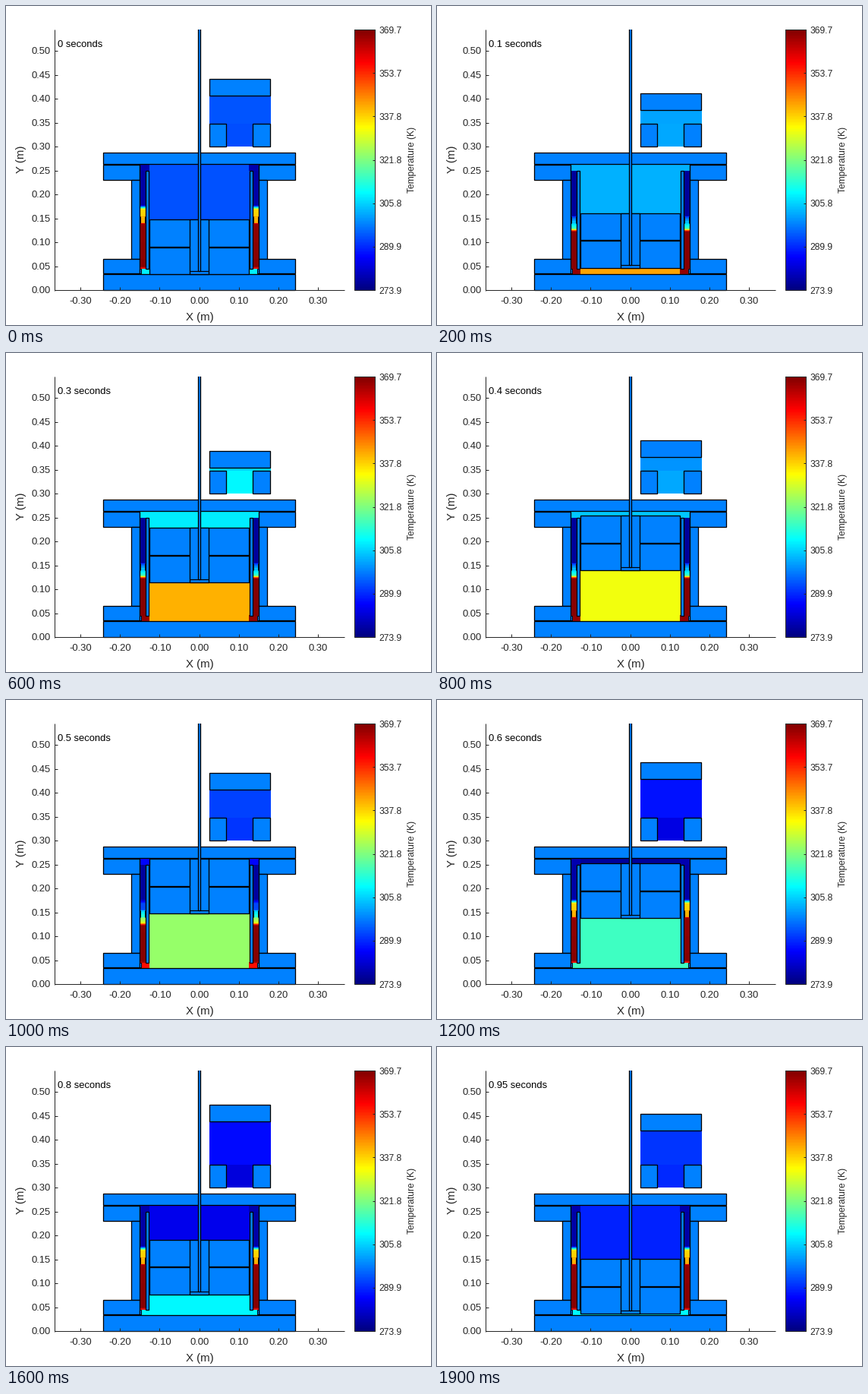
Animation of 560x420 px, one loop 2 s. Source, as a matplotlib script:

```python
import numpy as np
import matplotlib.pyplot as plt
from matplotlib.animation import FuncAnimation
from matplotlib.colors import ListedColormap
from matplotlib.patches import Rectangle

W, H, DPI = 560, 420, 100
FRAMES, STEP = 20, 100
PT = 72 / DPI
MID = 254.5
INK = "#262626"

# Blue-to-red scale built from three shifted trapezoids
shade = np.linspace(0, 1, 256)[:, None]
JET = ListedColormap(np.clip(1.5 - abs(4 * shade - [3, 2, 1]), 0, 1))
METAL = JET(0.2516)

plt.rcParams["font.family"] = "Liberation Sans"
fig = plt.figure(figsize=(W / DPI, H / DPI), dpi=DPI, facecolor="white")
ax = fig.add_axes([0, 0, 1, 1])
ax.axis("off")


def box(x0, y0, x1, y1, fill=METAL, edge="black", z=3, lw=1.3):
    patch = Rectangle((x0, y0), x1 - x0, y1 - y0, fc=fill, ec=edge,
                      lw=lw * PT, zorder=z, joinstyle="miter")
    return ax.add_patch(patch)


def gas(x0, y0, x1, y1):
    return box(x0, y0, x1, y1, "white", "none", 1, 0)


def pair(make, x0, y0, x1, y1, **kw):
    """A part and its mirror image about the engine's centre line."""
    return [make(x0, y0, x1, y1, **kw),
            make(2 * MID - x1, y0, 2 * MID - x0, y1, **kw)]


def line(xs, ys, color=INK, lw=1.0, z=6):
    return ax.plot(xs, ys, color=color, lw=lw * PT, zorder=z,
                   solid_capstyle="butt")[0]


def label(x, y, s, size=13, ha="center", color=INK, **kw):
    return ax.text(x, y, s, fontsize=size * PT, ha=ha, color=color,
                   zorder=8, **kw)


def bar(data, x0, y0, x1, y1):
    return ax.imshow(data, cmap=JET, vmin=0, vmax=1, aspect="auto",
                     extent=(x0, x1, y1, y0), interpolation="nearest",
                     zorder=2)


def place(patch, y0, y1):
    patch.set_y(y0)
    patch.set_height(max(y1 - y0, 0))


def paint(patches, value):
    for p in patches:
        p.set_facecolor(JET(value))


def wave(t, mean, *terms):
    """Periodic curve; each term holds a harmonic's cosine and sine parts."""
    a = 2 * np.pi * t
    return mean + sum(c * np.cos(k * a) + s * np.sin(k * a)
                      for k, (c, s) in enumerate(terms, 1))


def ease(t, start, end):
    u = np.clip((t - start) / (end - start), 0, 1)
    return u * u * (3 - 2 * u)


def mix(a, b, u):
    return a + (b - a) * u


# Side channel: steep step while gas returns, lower step while it is pushed
rows = np.arange(217, 346) + 0.5
returning = np.interp(rows, [262, 268, 285, 287, 343, 346],
                      [0.04, 0.66, 0.68, 0.98, 0.99, 0.84])
pushed = np.interp(rows, [276, 278, 293, 297], [0.03, 0.18, 0.45, 0.99])
ripple = 0.05 * ((rows > 277) & (rows < 284) & (rows // 1 % 2 == 1))

# Gas spaces
cold = gas(188, 208, 321, 217)
hot = gas(188, 346, 321, 353)
cold_ports = pair(gas, 176, 208, 189, 217)
hot_ports = pair(gas, 178, 345, 189, 353)
upper = gas(268, 118, 348.5, 155)
lower = gas(290, 155, 326, 185)
channels = [bar(returning[:, None], x, 217, x + 8, 346) for x in (176, 325)]

# Fixed engine parts
box(128, 353, 381, 374)
box(128, 193, 381, 208)
pair(box, 128, 209, 176, 229)
pair(box, 165, 229, 176, 333)
pair(box, 128, 333, 176, 352)
pair(box, 176, 346, 178, 352, lw=1)
pair(box, 184, 217, 188, 346)
for x in (177, 183):
    for side in (x, 2 * MID - x):
        line([side, side], [277, 286], "black", 1, 4)
box(268, 155, 290, 185)
box(325, 155, 348, 185)

# Moving parts
slug_top = box(189, 281, 320, 316, z=4)
slug_low = box(189, 317, 320, 353, z=4)
core = box(242, 281, 267, 353, z=4.2)
foot = line([242, 267], [349, 349], "black", 1.2, 4.3)
rod = box(253, 29, 256, 349, z=5)
rod.set_clip_path(Rectangle((240, 31), 30, 340, transform=ax.transData))
piston = box(268, 96, 348, 118)

# Axes
line([64, 64], [31, 374.5])
line([64, 446], [374, 374])
for i in range(11):
    y = 374 - 31.5 * i
    line([64, 68], [y, y])
    label(58.5, y + 4.1, f"{i * 0.05:.2f}", ha="right")
for i in range(-3, 4):
    x = MID + 52.1 * i
    line([x, x], [374, 370])
    label(x + 0.3, 391.5, f"{i / 10:.2f}")
label(255, 414.4, "X (m)", 15)
label(19.8, 202, "Y (m)", 15, rotation=90, va="center")

# Colour bar
bar(shade[::-1], 459, 31, 486, 374)
box(459, 31, 486, 374, "none", INK, 6, 1)
for i in range(7):
    y = 374 - 343 * i / 6
    line([483, 486], [y, y])
    label(491, y + 4.6, f"{273.9 + 95.8 * i / 6:.1f}", 12, "left")
label(534.8, 202.4, "Temperature (K)", 12, rotation=90, va="center")

clock = label(68.3, 54.4, "", 13, "left", "black")
ax.set_xlim(0, W)
ax.set_ylim(H, 0)


def draw(i):
    t = i / FRAMES

    low = wave(t, 315.4, (36, -0.8), (1.6, 0))
    top = low - 72
    place(slug_top, top, low - 36.5)
    place(slug_low, low - 35.5, low)
    place(core, top, low)
    foot.set_ydata([low - 4, low - 4])
    place(rod, 29, low - 4)
    place(cold, 208, top)
    place(hot, low, 353)

    head = wave(t, 99.6, (0, 28.3), (-3.6, 0))
    place(piston, head, head + 22)
    place(upper, head + 22, 155)

    push = ease(t, 0, 0.1) * (1 - ease(t, 0.45, 0.6))
    chill = wave(t, 0.2, (0.024, 0.155), (-0.017, -0.033), (0, 0.026))
    heat = np.interp(t, [0, 0.08, 0.3, 0.6, 0.8], [0.36, 0.713, 0.7, 0.434, 0.37])
    paint([cold], chill)
    paint([hot], heat)
    paint([upper], wave(t, 0.22, (0.01, 0.11), (-0.02, 0)))
    paint([lower], wave(t, 0.21, (0.012, 0.148), (-0.019, -0.009)))
    paint(cold_ports, mix(0.05, chill, push))
    paint(hot_ports, mix(heat, 0.98, push))
    strip = mix(returning, pushed, push) + ripple
    for c in channels:
        c.set_data(strip[:, None])

    clock.set_text(f"{t:.2g} seconds")
    return []


anim = FuncAnimation(fig, draw, frames=FRAMES, interval=STEP, repeat=True,
                     repeat_delay=0, init_func=lambda: draw(0), blit=False)
plt.show()
```
